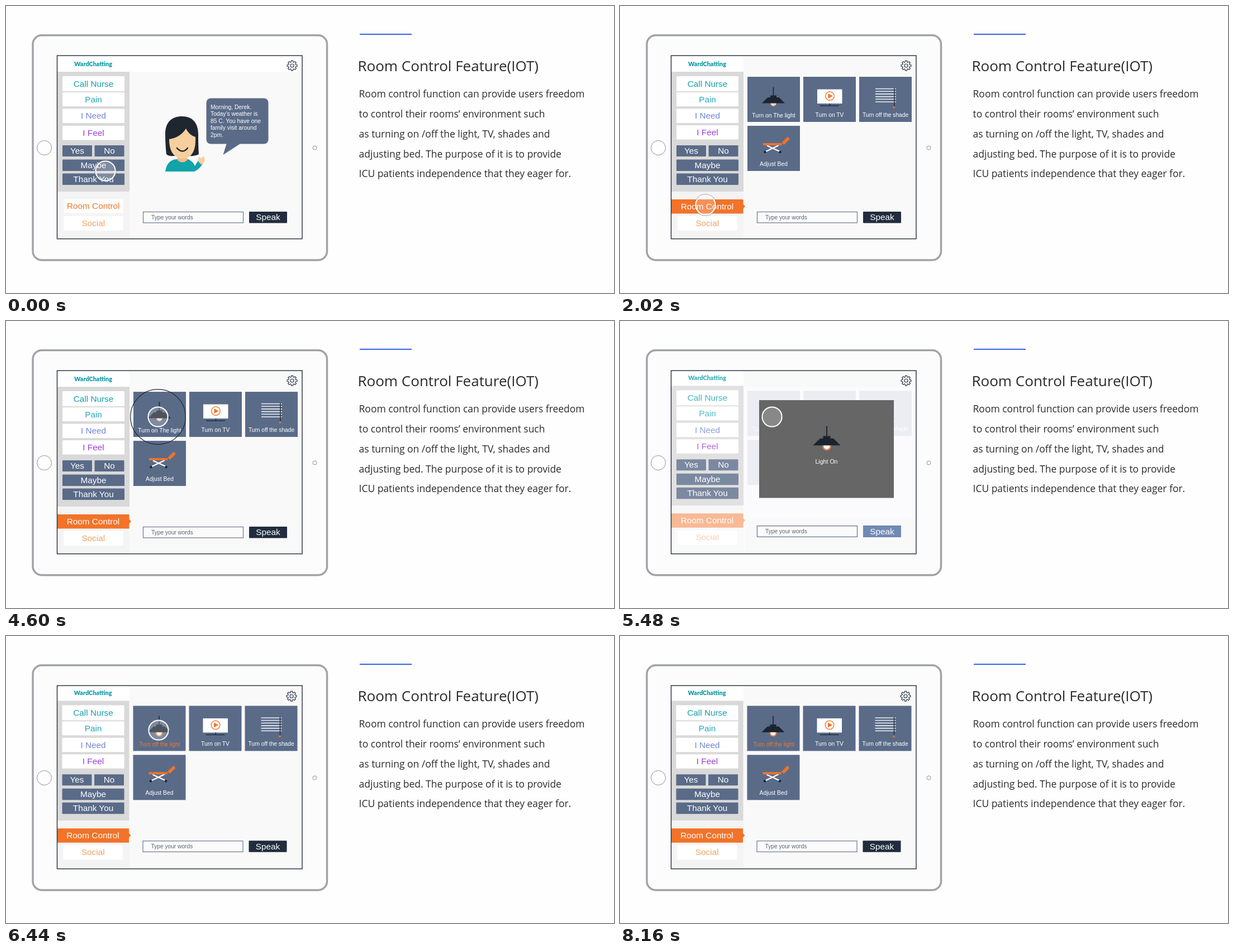
An HTML page that plays this animation: 1088 px wide and 515 px high, repeating every 8180 ms.

```html
<!DOCTYPE html>
<html lang="en">
<head>
<meta charset="utf-8">
<title>Room Control Feature</title>
<style>
html, body { margin: 0; width: 100%; height: 100%; overflow: hidden; background: #fefefe; }
svg { display: block; width: 1088px; height: 515px; }
.ui { font-family: "Liberation Sans", Arial, sans-serif; }
.copy { font-family: "Open Sans", "Noto Sans", sans-serif; fill: #2b2b2e; }
</style>
</head>
<body>
<svg id="stage" viewBox="0 0 1088 515" xmlns="http://www.w3.org/2000/svg"></svg>
<script>
const LOOP = 8180;
const SLATE = '#5a6b88', DARK = '#212d3e', ORANGE = '#f27329', PALE = '#f9f9f9';

const rect = (x, y, w, h, fill, more = '') =>
  `<rect x="${x}" y="${y}" width="${w}" height="${h}" fill="${fill}" ${more}/>`;
const path = (d, fill, more = '') => `<path d="${d}" fill="${fill}" ${more}/>`;
const line = (d, color, width, more = '') =>
  path(d, 'none', `stroke="${color}" stroke-width="${width}" ${more}`);
const circle = (x, y, r, fill, more = '') =>
  `<circle cx="${x}" cy="${y}" r="${r}" fill="${fill}" ${more}/>`;
const text = (s, x, y, size, fill, more = 'text-anchor="middle"') =>
  `<text x="${x}" y="${y}" font-size="${size}" fill="${fill}" ${more}>${s}</text>`;
const group = (id, body, more = '') => `<g id="${id}" ${more}>${body}</g>`;

function button(label, x, y, w, h, fill, color) {
  return rect(x, y, w, h, fill, 'rx="1"') + text(label, x + w / 2, y + h / 2 + 5, 15.3, color);
}

function gear(x, y) {
  const pts = [];
  for (let i = 0; i < 8; i++) {
    for (const [turn, r] of [[-.3, 6.5], [-.17, 9], [.17, 9], [.3, 6.5]]) {
      const a = i * Math.PI / 4 + turn;
      pts.push((x + r * Math.cos(a)).toFixed(2) + ' ' + (y + r * Math.sin(a)).toFixed(2));
    }
  }
  const pen = 'stroke="#2c3748" stroke-width="1.2" stroke-linejoin="round"';
  return path('M' + pts.join('L') + 'Z', 'none', pen) + circle(x, y, 3, 'none', pen);
}

function sidebar(active) {
  const lift = active ? 1 : 0;
  let s = rect(88, 86, 133, 32, '#fff') + rect(88, 118, 133, 215, '#d9d9d9')
    + rect(88, 333, 133, 92, '#f4f4f4')
    + text('WardChatting', 156, 107.5, 10.8, '#0d9ba6',
      'text-anchor="middle" font-family="Lato, sans-serif" font-weight="900"')
    + button('Call Nurse', 101, 126, 111, 27, '#fff', '#12a0aa')
    + button('Pain', 101, 155, 111, 25, '#fff', '#28a6ba')
    + button('I Need', 101, 184.5, 111, 25.5, '#fff', '#7186d4')
    + button('I Feel', 101, 215 - lift, 111, 25.5, '#fff', '#9a3ddc')
    + button('Yes', 101, 250, 53, 20, SLATE, '#fff')
    + button('No', 158.5, 250, 53, 20, SLATE, '#fff')
    + button('Maybe', 101, 275.5, 111, 20.5, SLATE, '#fff')
    + button('Thank You', 101, 300.5, 111, 20.5, SLATE, '#fff');
  s += active
    ? rect(88, 347, 132.5, 25.5, ORANGE) + path('M220 355L224 359.5L220 364Z', ORANGE)
      + text('Room Control', 156, 364.5, 15.3, '#fff')
    : button('Room Control', 103, 346.5, 106.5, 25.5, '#fff', '#e8772e');
  return s + button('Social', 103, 377, 106.5, 26, '#fff', '#f3a25e');
}

function footer(fill) {
  return rect(245.5, 369.5, 179, 19.5, '#fbfbfb', 'stroke="#6a7893" stroke-width="1.2"')
    + text('Type your words', 260, 383, 10.2, '#5c6474', '')
    + button('Speak', 435, 369, 68, 20.5, fill, '#fff');
}

function lamp(x, y, k, lit) {
  const bulb = lit
    ? circle(0, 1, 5.5, '#fff', 'stroke="#f08a45" stroke-width="2"')
    : circle(0, 0, 5, '#f8d9bd') + line('M-4.5 2A5 5 0 0 0 4.5 2', '#f3ae7c', 1);
  return `<g transform="translate(${x} ${y}) scale(${k})">` + bulb
    + line('M0 -29V-13', '#1c2430', 1.6)
    + path('M-5.5 -14H5.5V-10.5H10L20.5 0H-20.5L-10 -10.5H-5.5Z', '#1c2430') + '</g>';
}

function tv() {
  return rect(353, 149.5, 44.5, 25.5, '#fff')
    + line('M375.5 175V179M358 179H392', DARK, 1.5)
    + circle(375.5, 161.5, 7.8, 'none', 'stroke="#ee7d3a" stroke-width="1.5"')
    + path('M372.5 157L380.5 161.5L372.5 166Z', ORANGE);
}

function blinds() {
  let d = '';
  for (let i = 0; i < 6; i++) d += `M457 ${148.5 + i * 4.7}H494`;
  return line(d, '#eef0f4', 1.6) + line('M491 147V180', '#27303f', 1.5)
    + circle(490.5, 182, 2, '#d9713a');
}

function bed() {
  return line('M260 261.5L284 250M263 250.5L286 261', '#fff', 2.2)
    + circle(259.5, 262, 2.2, '#1c2430') + circle(286.5, 262, 2.2, '#1c2430')
    + line('M256 248H289.5', ORANGE, 4) + line('M291.5 247L302 236.5', ORANGE, 5.5);
}

function tiles(lit) {
  const spots = [[228, 127], [328, 127], [428, 127], [228, 215]];
  return spots.map(([x, y]) => rect(x, y, 94, 81, SLATE)).join('')
    + lamp(274.5, 174.5, 1, lit) + tv() + blinds() + bed()
    + (lit ? text('Turn off the light', 275.5, 199.5, 10.2, '#ec7a38')
      : text('Turn on The light', 275, 199.5, 10.3, '#fff'))
    + text('Turn on TV', 375, 198.5, 10.3, '#fff')
    + text('Turn off the shade', 475, 198.5, 10.2, '#fff')
    + text('Adjust Bed', 275, 287, 10.3, '#fff');
}

function woman() {
  const skin = '#f6cf9f', hair = '#1f2630', teal = '#12a3ab';
  return path('M285 297Q288 277 304 275H326Q335 279 338 287L344 277L352 283Q346 293 337 297Z', teal)
    + path('M343 278L345 274Q344 269 347 271L349 274Q352 268 354 271Q357 274 355 279Q353 284 349 284Z', skin)
    + path('M287 266Q285 250 285 230C285 208 297 198 315 198C333 198 344 209 344 230Q344 252 345 266Q338 270 330 269H300Q292 270 287 266Z', hair)
    + path('M307 262H324V277Q316 284 307 277Z', '#eebd89')
    + path('M292 239Q312 236 322 220Q328 232 339 235Q341 272 316 274Q292 272 292 239Z', skin)
    + line('M306 255Q316 266 325 255', '#2a2326', 2.6, 'stroke-linecap="round"');
}

function bubble() {
  const lines = ['Morning, Derek.', 'Today’s weather is', '85 C. You have one', 'family visit around', '2pm.'];
  return rect(358.5, 165.5, 111, 82, SLATE, 'rx="8"') + path('M395 246L388.5 267L421 246Z', SLATE)
    + lines.map((s, i) => text(s, 366, 185 + i * 12.4, 10.3, '#fff', '')).join('');
}

function home() {
  return rect(88, 86, 445, 340, PALE) + rect(88, 86, 445, 32, '#fff')
    + sidebar(false) + gear(512, 107) + woman() + bubble() + footer(DARK);
}

function room(lit, gx, gy) {
  return rect(88, 86, 445, 340, PALE) + sidebar(true) + gear(gx, gy) + tiles(lit) + footer(DARK);
}

function modal() {
  return room(false, 512, 108.7)
    + rect(221, 120, 312, 236, '#fcfcff', 'opacity=".9"')
    + rect(88, 86, 133, 256, '#fff', 'opacity=".2"')
    + rect(88, 342, 136, 84, '#fff', 'opacity=".5"')
    + footer('#708ab6')
    + rect(249, 143.7, 241, 175.5, '#666')
    + lamp(370, 225, 1.2, true) + text('Light On', 369.5, 257.5, 10.6, '#fff');
}

function tablet() {
  return rect(48, 52.5, 526.5, 403.5, '#fcfcfc', 'rx="16" stroke="#a1a2a7" stroke-width="3.4"')
    + circle(68.5, 254.5, 13, '#fefefe', 'stroke="#8d8e92" stroke-width="1"')
    + circle(552.5, 254.5, 3.5, '#fefefe', 'stroke="#8d8e92" stroke-width="1"');
}

const copy = ['Room control function can provide users freedom',
  'to control their rooms’ environment such',
  'as turning on /off the light, TV, shades and',
  'adjusting bed. The purpose of it is to provide',
  'ICU patients independence that they eager for.'];

document.getElementById('stage').innerHTML =
  '<defs><clipPath id="screen"><rect x="91.5" y="89" width="438.5" height="328.8"/></clipPath></defs>'
  + rect(0, 0, 1088, 515, '#fefefe') + tablet()
  + '<g class="ui" clip-path="url(#screen)">'
  + group('home', home()) + group('room', room(false, 512, 107))
  + group('modal', modal(), 'transform="translate(0 -1.7)"')
  + group('after', room(true, 511.5, 109.7), 'transform="translate(-.5 -1.7)"') + '</g>'
  + rect(91.5, 89, 438.5, 328.8, 'none', 'stroke="#262d3a" stroke-width="1.4"')
  + line('M633 50.7H726', '#2b5ce2', 2)
  + group('title', text('Room Control Feature(IOT)', 629.4, 117.2, 26, '#2b2b2e', ''), 'class="copy"')
  + group('body', copy.map((s, i) => text(s, 631.6, 164 + i * 35.85, 17.45, '#2b2b2e', '')).join(''), 'class="copy"')
  + circle(0, 0, 18, 'none', 'id="ripple" stroke="#20252e" stroke-width="1.2"')
  + group('cursor', circle(0, 0, 19, 'none', 'stroke="#70747c" stroke-opacity=".5" stroke-width="1.4"')
    + circle(0, 0, 17.6, '#fff', 'fill-opacity=".22" stroke="#fff" stroke-width="2"'));

const el = {};
for (const id of ['room', 'modal', 'after', 'title', 'body', 'ripple', 'cursor'])
  el[id] = document.getElementById(id);

const part = (t, a, b) => Math.min(1, Math.max(0, (t - a) / (b - a)));
const smooth = u => u * u * (3 - 2 * u);
const mix = (a, b, u) => a + (b - a) * u;
const move = (node, x, y) => node.setAttribute('transform', `translate(${x.toFixed(2)} ${y.toFixed(2)})`);

function fade(node, v) {
  node.setAttribute('opacity', v.toFixed(3));
  node.style.display = v > 0 ? '' : 'none';
}

function cursorAt(t) {
  if (t < 2300) {
    const u = smooth(part(t, 0, 820));
    return [mix(178, 153, u), mix(296, 357, u)];
  }
  if (t < 6000) {
    const u = smooth(part(t, 2300, 3160));
    return [mix(153, 272, 1 - (1 - u) ** 2), mix(357, 172, u)];
  }
  const nudge = smooth(part(t, 6000, 6400)), u = smooth(part(t, 6620, 7400));
  return [272 + nudge + 135 * u, 172 - 3 * nudge - 133 * u];
}

function draw(t) {
  fade(el.room, part(t, 1680, 1980));
  fade(el.modal, part(t, 4660, 4950));
  fade(el.after, part(t, 5825, 6125));

  const shifted = t >= 420 && t < 1300;
  move(el.title, shifted ? -15 : 0, shifted ? -70 : 0);
  move(el.body, shifted ? -46 : 0, shifted ? -75.5 : 0);

  const [x, y] = cursorAt(t);
  move(el.cursor, x, y);
  fade(el.cursor, 1 - part(t, 7300, 7400));

  const tap = t < 3000 ? 1140 : 4160;
  const u = part(t, tap, tap + 480);
  move(el.ripple, x, y);
  el.ripple.setAttribute('r', mix(18, 49.5, 1 - (1 - u) ** 2));
  fade(el.ripple, u > 0 ? 1 - part(t, tap + 480, tap + 560) : 0);
}

const start = performance.now();
function tick() {
  draw((performance.now() - start) % LOOP);
  requestAnimationFrame(tick);
}
tick();
</script>
</body>
</html>
```
